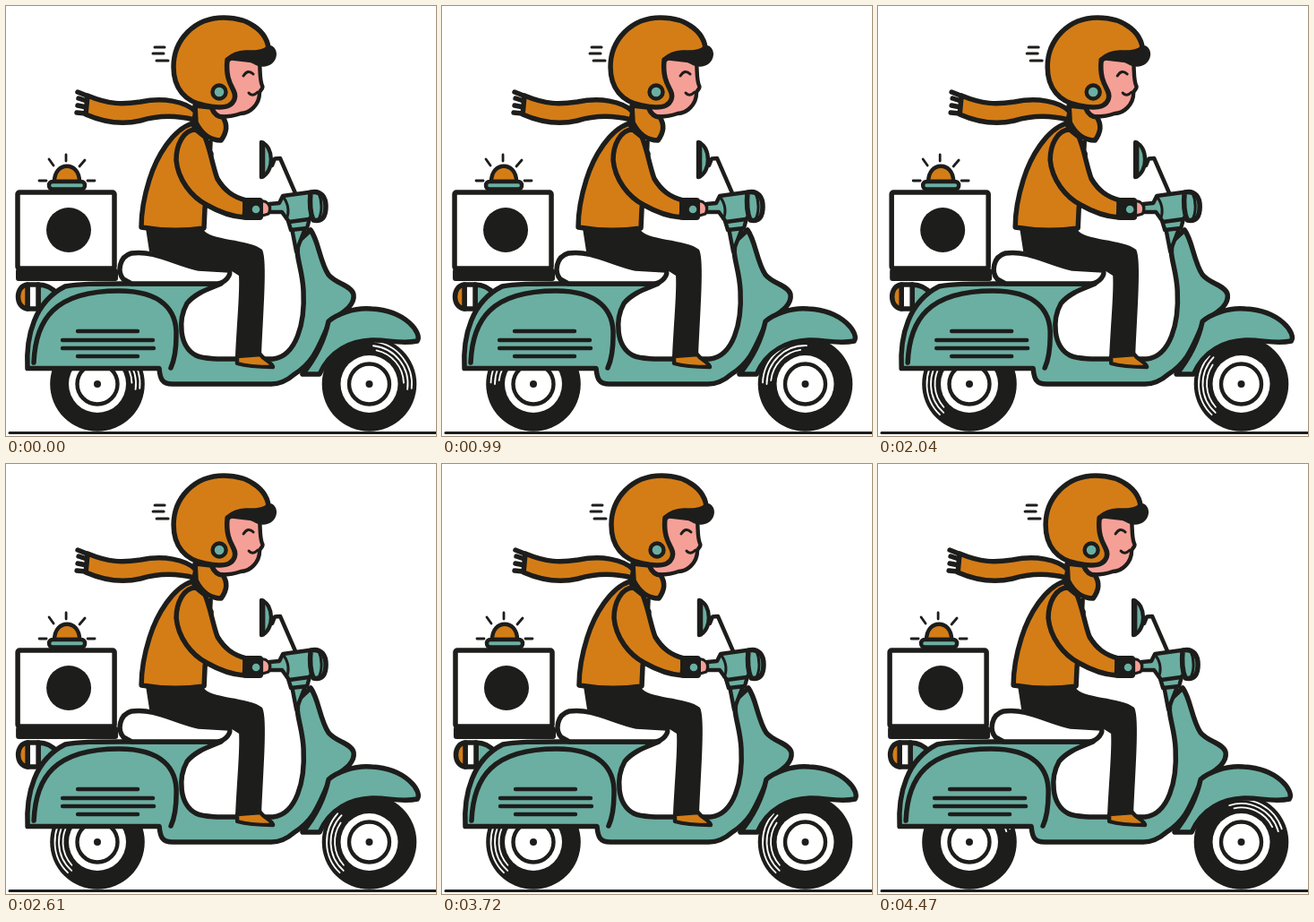
Animation, 480 px wide and 480 px high, one loop 4.5 s. Source, as an HTML page:

```html
<!DOCTYPE html>
<html lang="en">
<head>
<meta charset="utf-8">
<title>Scooter courier</title>
<style>
  html, body { margin: 0; width: 100%; height: 100%; overflow: hidden; background: #fff; }
  svg { display: block; width: 100vw; height: 100vh; }
  path, rect, circle { stroke: #1d1d1b; stroke-width: 5.5; stroke-linejoin: round; stroke-linecap: round; }
  .teal { fill: #6bafa2; }
  .orange { fill: #d47d17; }
  .skin { fill: #f5a097; }
  .white { fill: #fff; }
  .dark { fill: #1d1d1b; }
  .line { fill: none; }
  .bare { stroke: none; }
  .thin { stroke-width: 3; }
  .mid { stroke-width: 4.4; }
  .shine path { fill: none; stroke: #fff; stroke-width: 1.8; }
</style>
</head>
<body>
<svg viewBox="0 0 480 480">
  <defs>
    <g id="tyre">
      <circle class="dark bare" r="52.8"/>
      <circle class="white bare" r="32"/>
      <circle class="white mid" r="22.5"/>
      <circle class="dark bare" r="4"/>
    </g>
  </defs>

  <path class="line thin" d="M4 476.5H480"/>
  <g id="wheels"></g>

  <g id="rider">
    <!-- tail light -->
    <path class="teal" d="M36 311C46 311 53 316 58 322L42 338H36Z"/>
    <path class="white" d="M24 311H36V338H24Z"/>
    <path class="orange" d="M24 311C10 312 10 337 24 338Z"/>

    <!-- body -->
    <path class="teal" d="M340 250C349 262 350 285 360 300C368 310 386 312 388 322C390 336 372 344 362 352C350 376 346 396 322 411C314 418 306 422 296 422H186C174 422 172 416 171 404.5H24C22 368 32 330 66 313C80 310 100 310 130 310H240C226 316 212 320 202 332C192 350 193 380 212 390C222 395 240 394 298 394C324 391 334 354 332 318C331 292 321 276 327 262Z"/>
    <path class="line" d="M31 398C33 350 54 318 126 318C174 318 191 340 190 368C190 384 188 395 184 404"/>
    <path class="line mid" d="M80 363H147M63 373H164M63 382H165M80 391H147"/>
    <path class="teal" d="M331 411H350C362 384 385 374 408 373C425 372 440 378 459 374C465 366 447 340 408 338C388 336 368 345 360 352C354 380 340 400 331 411Z"/>
    <path class="white" d="M131 305C124 297 126 280 140 276C165 272 190 288 215 293L249 295C252 300 245 309 236 310H140Z"/>

    <!-- box -->
    <rect class="dark bare" x="11" y="293" width="114" height="14" rx="3"/>
    <rect class="white" x="13" y="208" width="108" height="85" rx="2"/>
    <circle class="dark bare" cx="70" cy="250" r="25"/>

    <!-- beacon -->
    <path class="orange mid" d="M54 196C54 173 82 173 82 196Z"/>
    <rect class="teal mid" x="48" y="196" width="40" height="8.5" rx="4"/>
    <path class="line" style="stroke-width:2.8" d="M67 166V173M48 171L53 178M88 172L82 179M37 195H45M91 195H99"/>

    <!-- steering -->
    <path class="line mid" d="M297 178L300 170.5L306 170L323 209"/>
    <path class="teal mid" d="M285 152C299 156 300 186 285 191Z"/>
    <path class="line" d="M286.5 153V190"/>
    <path class="teal mid" d="M319 248L324 274L334 248Z"/>
    <path class="teal mid" d="M315 240L339 237L336 248L318 250Z"/>
    <path class="teal mid" d="M294 221L305 220L309 212L338 208C345 212 345 234 338 238L316 241L308 230H294Z"/>
    <path class="line thin" d="M310 214C316 222 316 232 313 238"/>
    <path class="teal" d="M340 208C352 205 357 214 357 224C357 235 353 241 343 239C339 230 339 218 340 208Z"/>
    <path class="line thin" d="M349 209C353 218 353 230 349 238"/>

    <!-- legs -->
    <path class="dark bare" d="M156 248L220 249C226 262 272 260 286 272C292 284 287 340 285 392H256C258 350 261 320 260 301L249 294C215 296 190 284 160 274Z"/>
    <path class="orange mid" d="M258 391L284 389C288 395 297 398 298 403C284 403 268 402 258 399Z"/>

    <!-- jacket -->
    <path class="line" d="M228 152C226 174 232 194 249 209"/>
    <path class="orange" d="M208 131C186 138 168 168 160 194C154 213 151 230 151 247Q186 253 221 248L222 226L229 165Z"/>
    <path class="skin thin" d="M283 218C292 216 297 224 293 232L283 235Z"/>
    <path class="orange" d="M212 138C198 138 190 155 190 172C192 194 207 213 224 222C238 230 252 235 266 236L268 217C253 213 244 206 236 193C231 180 228 160 222 146Z"/>
    <rect class="dark bare" x="264" y="214" width="23" height="25" rx="4"/>
    <circle class="teal thin" cx="279" cy="227" r="5.8"/>

    <!-- scarf -->
    <path class="line" d="M90 100L80 96M90 106L81 103M90 113L80 111M89 120L79 119"/>
    <path class="orange" d="M91 100C115 110 130 110 150 107C175 102 200 106 212 118L210 127C190 122 170 122 150 128C125 134 105 128 89 121Z"/>

    <!-- head -->
    <path class="skin mid" d="M248 58L283 62C284 74 283 82 286 89C288 92 283 94 283 97C283 110 272 120 262 120C254 123 242 124 232 123L230 100Z"/>
    <path class="orange" d="M211 111L229 113C232 120 237 124 242 124C248 133 246 142 240 150C228 150 218 142 212 130Z"/>
    <path class="orange" d="M247 60C258 50 276 50 293 56C296 30 272 13 243 13C210 13 187 38 187 68C187 92 200 107 222 111C240 115 252 113 255 104C259 93 244 90 247 60Z"/>
    <path class="dark bare" d="M246 68C250 56 263 57 277 65C287 71 301 67 302 54C302 46 296 43 291 44C286 53 262 46 246 58Z"/>
    <circle class="teal mid" cx="238" cy="96" r="7.5"/>
    <path class="line thin" d="M265 78Q270 70 276 76M271 97Q275 102 281 96"/>
    <path class="line thin" d="M166 46H177M164 53H176M168 61H181"/>
  </g>
</svg>
<script>
  const LOOP = 4500, FRAMES = 120, STEP = 6;
  // sideways shake, one value per STEP frames
  const SHAKE = [0, 1.4, .2, -1.9, 1.4, 0, -.4, 1.4, 0, 2.2,
                 .3, -.4, .6, -2.3, -2.5, -1.4, 1.8, 2.2, -2, 1.6];
  const SPIN = 24, REST = -38;
  const rider = document.getElementById('rider');
  const wheels = document.getElementById('wheels');

  function arc(r, from, to) {
    const at = a => [r * Math.cos(a * Math.PI / 180), r * Math.sin(a * Math.PI / 180)].map(v => v.toFixed(2));
    return `<path d="M${at(from)}A${r} ${r} 0 0 1 ${at(to)}"/>`;
  }
  const shine = arc(47.5, -44, 44) + arc(43, -46, 46) + arc(38.5, -40, 36);
  wheels.innerHTML = [102, 405.5].map(x =>
    `<g transform="translate(${x} 422)"><use href="#tyre"/><g class="shine">${shine}</g></g>`).join('');
  const shines = wheels.querySelectorAll('.shine');

  // four drawings per 150 ms, the first held twice as long
  function frameAt(ms) {
    const slot = Math.floor(ms / 30);
    return 4 * Math.floor(slot / 5) + Math.max(0, slot % 5 - 1);
  }

  function shakeAt(n) {
    const i = Math.floor(n / STEP), f = n / STEP - i, ease = f * f * (3 - 2 * f);
    return SHAKE[i] * (1 - ease) + SHAKE[(i + 1) % SHAKE.length] * ease;
  }

  function draw(ms) {
    const n = frameAt(ms % LOOP) % FRAMES;
    rider.setAttribute('transform', `translate(${shakeAt(n).toFixed(2)} 0)`);
    shines.forEach(s => s.setAttribute('transform', `rotate(${n * SPIN + REST})`));
  }

  const start = performance.now();
  function tick() {
    draw(performance.now() - start);
    requestAnimationFrame(tick);
  }
  draw(0);
  requestAnimationFrame(tick);
</script>
</body>
</html>
```
